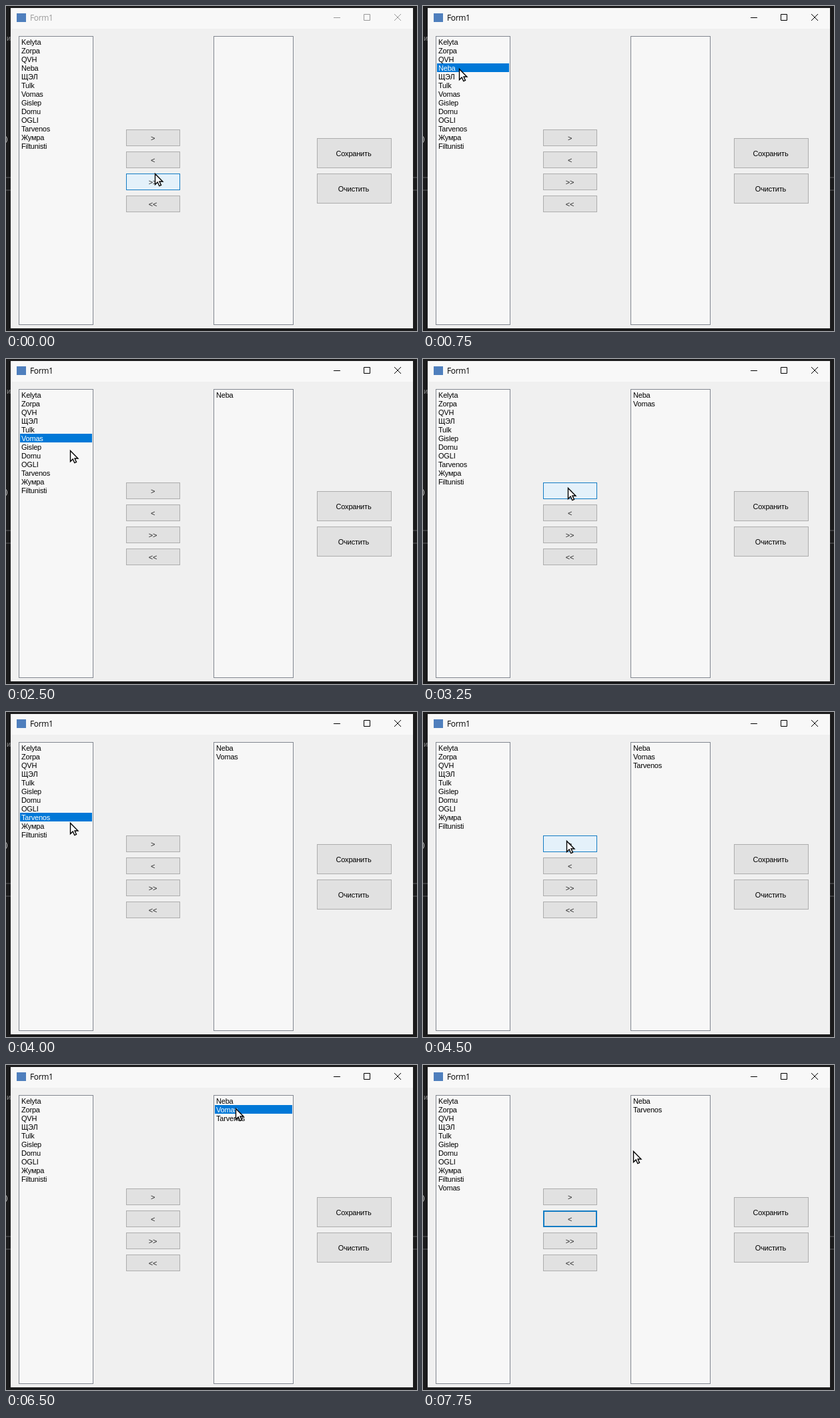
Animation of 616x487 px, one loop 8 s. Source, as an HTML page:

```html
<!DOCTYPE html>
<html lang="ru">
<head>
<meta charset="utf-8">
<title>Form1</title>
<style>
  html, body { margin: 0; width: 100%; height: 100%; overflow: hidden; background: #1b1b1c; }
  svg { display: block; }
  text { font: 11px "Liberation Sans", Arial, sans-serif; letter-spacing: -.2px; fill: #000; white-space: pre; }
  .title { font: 12px "Open Sans", "Noto Sans", sans-serif; letter-spacing: -.4px; }
  .mid { text-anchor: middle; }
</style>
</head>
<body>
<svg id="stage" width="616" height="487" viewBox="0 0 616 487"></svg>
<script>
const STEP = 250, LOOP = 8000;
const FACE = '#e1e1e1', HOVER = '#e4f1fa', EDGE = '#adadad', BLUE = '#0078d7', RING = '#147cc4';
const NAMES = ['Kelyta', 'Zorpa', 'QVH', 'Neba', 'ЩЭЛ', 'Tulk', 'Vomas', 'Gislep',
  'Dornu', 'OGLI', 'Tarvenos', 'Жумра', 'Filtunisti'];
const ARROWS = ['>', '<', '>>', '<<'];

// Where the pointer stops, and what it clicks there
const STOPS = [
  { at: 0, x: 223, y: 251 },
  { at: 750, x: 54, y: 94, pick: 'Neba' },
  { at: 1500, x: 204, y: 195, press: '>' },
  { at: 1750, x: 200, y: 193 },
  { at: 2250, x: 54, y: 118, pick: 'Vomas' },
  { at: 3000, x: 217, y: 193, press: '>' },
  { at: 3250, x: 217, y: 193 },
  { at: 3750, x: 54, y: 156, pick: 'Tarvenos' },
  { at: 4500, x: 215, y: 193, press: '>' },
  { at: 5250, x: 215, y: 254 },
  { at: 6250, x: 346, y: 65, pick: 'Vomas' },
  { at: 6500, x: 344, y: 65 },
  { at: 7250, x: 216, y: 232, press: '<' },
  { at: 7500, x: 216, y: 234 },
  { at: 7750, x: 315, y: 129 }
];

function pointerAt(time) {
  const i = STOPS.findLastIndex(s => s.at <= time);
  const a = STOPS[i], b = STOPS[i + 1] || a;
  const k = b === a ? 0 : (time - a.at) / (b.at - a.at);
  const ease = k * k * (3 - 2 * k);
  return { x: Math.round(a.x + (b.x - a.x) * ease), y: Math.round(a.y + (b.y - a.y) * ease) };
}

function stateAt(time) {
  const s = { left: NAMES, right: [], picked: null, focus: null, active: false };
  for (const { at, pick, press } of STOPS) {
    if (at > time) break;
    if (pick) Object.assign(s, { picked: pick, focus: null, active: true });
    if (press) {
      const [from, to] = press === '>' ? ['left', 'right'] : ['right', 'left'];
      s[from] = s[from].filter(n => n !== s.picked);
      s[to] = [...s[to], s.picked];
      s.picked = null;
      s.focus = press;
    }
  }
  return s;
}

const rect = (x, y, w, h, fill, stroke, line = 1) => stroke
  ? `<rect x="${x + line / 2}" y="${y + line / 2}" width="${w - line}" height="${h - line}" fill="${fill}" stroke="${stroke}" stroke-width="${line}"/>`
  : `<rect x="${x}" y="${y}" width="${w}" height="${h}" fill="${fill}"/>`;

const label = (x, y, str, fill = '#000', cls = '') =>
  `<text x="${x}" y="${y}" class="${cls}" style="fill:${fill}">${str.replace(/</g, '&lt;')}</text>`;

const backdrop = () => rect(0, 0, 616, 487, '#1b1b1c')
  + rect(0, 256, 616, 2, '#3c3c3e') + rect(0, 275, 616, 2, '#3c3c3e')
  + label(1, 52, 'и', '#8d8d8d') + label(-1, 203, ')', '#d8d8d8');

function frame(active) {
  const ink = active ? '#000' : '#999';
  return rect(7, 3, 603, 480, '#f0f0f0') + rect(7, 3, 603, 31, '#f8f8f8')
    + rect(16, 11, 14, 13, '#4f7fbd')
    + label(36, 22, 'Form1', ink, 'title')
    + `<path d="M491 17.5h10M536.5 12.5h9v9h-9zM582 12l10 10M592 12l-10 10" fill="none" stroke="${ink}"/>`;
}

function list(x, w, items, picked) {
  return rect(x, 45, w, 433, '#f7f7f7', '#828790') + items.map((name, i) => {
    const y = 47 + 13 * i, on = name === picked;
    return (on ? rect(x + 2, y, w - 4, 13, BLUE) : '') + label(x + 4, y + 11, name, on ? '#fff' : '#000');
  }).join('');
}

function arrowButton(str, i, at, focus) {
  const y = 185 + 33 * i;
  const hover = at.x >= 180 && at.x < 261 && at.y >= y && at.y < y + 25;
  const look = hover ? [HOVER, RING] : focus === str ? [FACE, RING, 2] : [FACE, EDGE];
  return rect(180, y, 81, 25, ...look) + label(220, y + 17, str, '#222', 'mid');
}

const bigButton = (y, str) =>
  rect(466, y, 112, 45, FACE, EDGE) + label(521, y + 27, str, '#000', 'mid');

const arrow = ({ x, y }) =>
  `<path transform="translate(${x + .5} ${y + .5})" d="M0 0V16L3.7 12.5 6.3 18.2 9 17 6.5 11.5H11.4Z" fill="#fff" stroke="#000" stroke-width="1.4"/>`;

function draw(time) {
  const s = stateAt(time), at = pointerAt(time);
  stage.innerHTML = backdrop() + frame(s.active)
    + list(19, 112, s.left, s.picked) + list(311, 120, s.right, s.picked)
    + ARROWS.map((str, i) => arrowButton(str, i, at, s.focus)).join('')
    + bigButton(198, 'Сохранить') + bigButton(251, 'Очистить')
    + arrow(at);
}

const stage = document.getElementById('stage');
const start = performance.now();
let shown = -1;

function tick() {
  const step = Math.floor((performance.now() - start) % LOOP / STEP);
  if (step !== shown) draw((shown = step) * STEP);
  requestAnimationFrame(tick);
}
tick();
</script>
</body>
</html>
```
